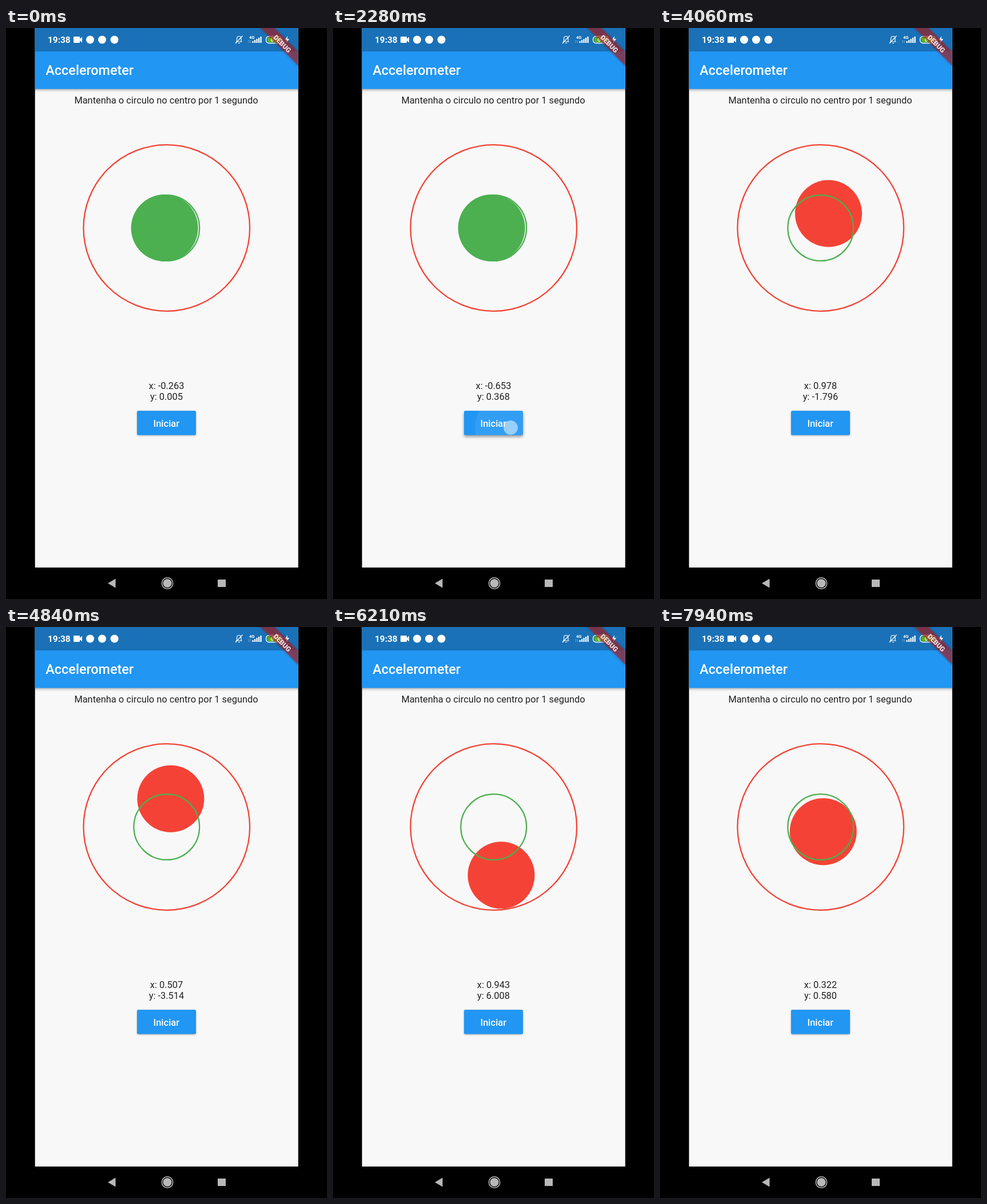
Write an HTML page that moves like this. It is 561 px wide and 998 px high and loops after 7990 ms.

```html
<!DOCTYPE html>
<html lang="pt">
<head>
<meta charset="utf-8">
<title>Accelerometer</title>
<style>
  html, body { margin: 0; width: 100%; height: 100%; overflow: hidden; background: #000; }
  svg { display: block; width: 100vw; height: 100vh; font-family: Roboto, sans-serif; }
  .body { font-size: 16.4px; fill: #212121; text-anchor: middle; }
  .medium { font-weight: 500; fill: #fff; }
  .bold { font-weight: 700; fill: #fff; }
  .shadow { filter: drop-shadow(0 2px 2px rgba(0, 0, 0, .3)); }
</style>
</head>
<body>
<svg viewBox="0 0 561 998">
  <clipPath id="screen"><rect x="50.7" width="460" height="943"/></clipPath>
  <clipPath id="buttonClip"><rect x="229" y="669" width="103" height="42.6" rx="2.3"/></clipPath>

  <g clip-path="url(#screen)">
    <rect x="50" width="462" height="943" fill="#f8f8f8"/>
    <rect class="shadow" x="41" y="-10" width="480" height="116.6" fill="#2196f3"/>
    <rect x="50" width="462" height="41" fill="#1a71b7"/>
    <text class="medium" x="69.3" y="82" font-size="23.4">Accelerometer</text>
    <text class="body" x="280" y="131.5">Mantenha o circulo no centro por 1 segundo</text>

    <circle cx="280.75" cy="349.5" r="145.3" fill="none" stroke="#f44336" stroke-width="2.3"/>
    <circle id="ball" r="58.5"/>
    <circle cx="280.75" cy="349.5" r="57.4" fill="none" stroke="#4caf50" stroke-width="2.3"/>

    <text class="body" id="xText" x="280.5" y="631"></text>
    <text class="body" id="yText" x="280.5" y="650"></text>

    <rect id="button" x="229" y="669" width="103" height="42.6" rx="2.3" fill="#2196f3"/>
    <g clip-path="url(#buttonClip)">
      <circle id="ripple" cx="310.5" cy="698.5" fill="#fff"/>
    </g>
    <text class="medium" x="280.3" y="696.5" font-size="16.4" text-anchor="middle">Iniciar</text>
    <circle id="touch" cx="310.5" cy="698.5" r="12.5" fill="#fff" fill-opacity=".5"/>
  </g>

  <!-- status bar -->
  <g fill="#fff">
    <text class="medium" x="73" y="26" font-size="15.4" style="font-weight: 600">19:38</text>
    <path d="M119 15h9q1 0 1 1v3l4-3.5v10l-4-3.5v3q0 1-1 1h-9q-1 0-1-1v-9q0-1 1-1z"/>
    <circle cx="147" cy="20.5" r="7"/>
    <circle cx="168" cy="20.5" r="7"/>
    <circle cx="189.5" cy="20.5" r="7"/>
    <path d="M401.5 24h11M403.5 24v-5q0-4.5 3.7-4.5t3.7 4.5v5M406 26.5h3M401 27l12.500-13.500" fill="none" stroke="#fff" stroke-width="1.2"/>
    <text class="bold" x="425" y="18.5" font-size="7.5">4G</text>
    <path d="M424 21.5v4M427 21.5v4" stroke="#fff" stroke-opacity=".6" stroke-dasharray="1.5 1"/>
    <path d="M431.5 26v-3M435 26v-5M438.5 26v-7M442 26v-9M445.5 26v-11" stroke="#fff" stroke-width="2.3"/>
    <rect x="454.5" y="14.5" width="27" height="12" rx="5" fill="none" stroke="#fff" stroke-width="1.3"/>
    <rect x="456.5" y="16" width="17" height="9" rx="4" fill="#5bb612"/>
    <path d="M472 16h4q4 0 4 4.500t-4 4.500h-4z" fill="#5bb612"/>
    <path d="M483 18.5q2 2 0 4z"/>
    <text class="bold" x="468" y="24.3" font-size="10" text-anchor="middle">61</text>
    <path d="M492 14l-5 7.5h3.5l-1 5.5 5.5-8h-3.5z"/>
  </g>

  <!-- corner banner -->
  <g clip-path="url(#screen)">
    <g transform="translate(510.5 0) rotate(45)">
      <rect x="-60" y="29" width="120" height="17.5" fill="#b71c1c" fill-opacity=".6"
            style="filter: drop-shadow(0 0 2px rgba(0, 0, 0, .35))"/>
      <text y="43.3" font-size="11.9" font-weight="900" fill="#fff" fill-opacity=".85" text-anchor="middle">DEBUG</text>
    </g>
  </g>

  <!-- navigation bar -->
  <g fill="#b8b8b8">
    <path d="M178 970.5l13.500-8v16z"/>
    <circle cx="282" cy="970.5" r="7.600"/>
    <circle cx="282" cy="970.5" r="9.700" fill="none" stroke="#b8b8b8" stroke-width="1.5"/>
    <rect x="370" y="964" width="14" height="13"/>
  </g>
</svg>

<script>
const LOOP = 7990, START = 2240, TICK = 200;
const PRESS = 2120, LIFT = 2300, RIPPLE_END = 2600;
const CENTER = { x: 280.75, y: 349.5 }, SCALE = 14.04;
const IDLE = [-0.263, 0.005];

// Sensor readings: [tick, x, y]
const readings = [
  [0, -0.653, 0.368],
  [4, 1.646, 0.644],
  [13, 0.507, -3.514],
  [19, 0.943, 6.008],
  [28, 0.322, 0.58]
];

const $ = id => document.getElementById(id);
const clamp = v => Math.min(1, Math.max(0, v));
const set = (id, attrs) => {
  for (const k in attrs) $(id).setAttribute(k, attrs[k]);
};

function sense(tick) {
  if (tick < 0) return IDLE;
  const i = Math.max(1, readings.findIndex(r => r[0] >= tick));
  const a = readings[i - 1], b = readings[i];
  const p = clamp((tick - a[0]) / (b[0] - a[0]));
  const e = (1 - Math.cos(Math.PI * p)) / 2;
  return [1, 2].map(k => a[k] + (b[k] - a[k]) * e);
}

function draw(t) {
  const tick = Math.min(28, Math.floor((t - START) / TICK));
  const [x, y] = sense(tick);
  $('xText').textContent = 'x: ' + x.toFixed(3);
  $('yText').textContent = 'y: ' + y.toFixed(3);

  // The ball first follows the sensor one tick after the tap
  const [bx, by] = tick < 1 ? IDLE : [x, y];
  const dx = bx * SCALE, dy = by * SCALE;
  const centered = Math.abs(dx) < 4 && Math.abs(dy) < 4;
  set('ball', { cx: CENTER.x + dx, cy: CENTER.y + dy, fill: centered ? '#4caf50' : '#f44336' });

  const active = t >= PRESS && t < RIPPLE_END;
  const fade = 1 - clamp((t - LIFT) / (RIPPLE_END - LIFT));
  set('ripple', {
    r: 22 + 90 * clamp((t - PRESS) / 360),
    'fill-opacity': active ? 0.08 * fade : 0
  });
  set('touch', { visibility: t >= PRESS && t < LIFT ? 'visible' : 'hidden' });
  const lift = active ? fade : 0;
  $('button').style.filter =
    `drop-shadow(0 ${1.5 + 1.5 * lift}px ${1.5 + lift}px rgba(0,0,0,${0.3 + 0.1 * lift}))`;
}

function frame() {
  draw(performance.now() % LOOP);
  requestAnimationFrame(frame);
}
frame();
</script>
</body>
</html>
```
